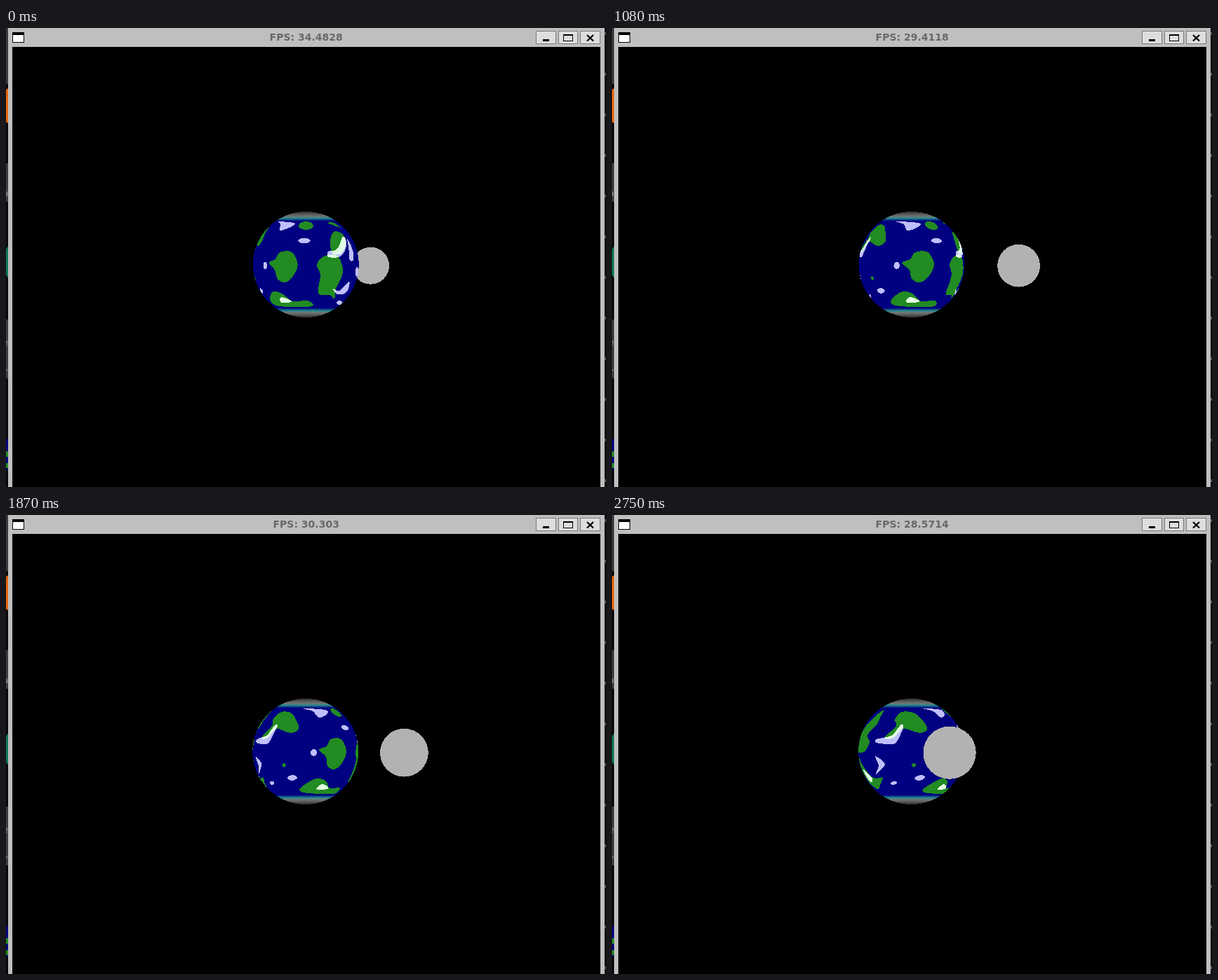
Animation, 855 px wide and 655 px high, one loop 2810 ms. Source, as an HTML page:

```html
<!DOCTYPE html>
<html lang="en">
<head>
<meta charset="utf-8">
<title>Globe and moon</title>
<style>
html, body { margin: 0; width: 100%; height: 100%; overflow: hidden; background: #000; }
svg { display: block; width: 855px; height: 655px; }
#title { font: bold 14px "DejaVu Sans", sans-serif; fill: #686868; text-anchor: middle; }
.side { font: 12px "DejaVu Sans", sans-serif; fill: #999; text-anchor: end; }
.crisp { shape-rendering: crispEdges; }
</style>
</head>
<body>
<svg viewBox="0 0 855 655">
  <defs>
    <linearGradient id="half" gradientUnits="userSpaceOnUse" x1="0" y1="262" x2="0" y2="337.5">
      <stop offset="0" stop-color="#303030"/>
      <stop offset=".07" stop-color="#686868"/>
      <stop offset=".095" stop-color="#6c7878"/>
      <stop offset=".125" stop-color="#258a8e"/>
      <stop offset=".18" stop-color="#000080"/>
    </linearGradient>
    <linearGradient id="sea" href="#half" spreadMethod="reflect"/>
    <clipPath id="onLand"><path id="landClip"/></clipPath>
  </defs>

  <rect width="855" height="655" fill="#080808"/>
  <g id="desk">
    <path fill="#3c3c3c" d="M0 0h3v80h-3zM0 193h3v55h-3zM0 416h3v84h-3z"/>
    <path fill="#e8660c" d="M0 88L3 86V136L0 134z"/>
    <path fill="#0b7a55" d="M0 316L3 311V357L0 352z"/>
    <path fill="#000080" d="M0 588L3 585V630H0z"/>
    <path fill="#228b22" d="M0 604h3v8h-3zM0 621h3v7h-3z"/>
    <text class="side" x="3" y="240">a</text>
    <text class="side" x="3" y="453">e</text>
    <text class="side" x="3" y="489">,</text>
  </g>
  <rect x="3" width="850" height="655" fill="#bfbfbf"/>
  <rect x="9" y="27" width="838" height="628"/>

  <g class="crisp">
    <rect x="9" y="6" width="17" height="15"/>
    <rect x="10" y="10" width="15" height="10" fill="#fff"/>
    <g fill="#dedede" stroke="#787878">
      <rect x="755.5" y="4.5" width="28" height="18"/>
      <rect x="787.5" y="4.5" width="27" height="18"/>
      <rect x="818.5" y="4.5" width="28" height="18"/>
    </g>
    <rect x="765" y="16" width="9" height="3"/>
    <path fill="none" stroke="#000" d="M794.5 9.5h13v9h-13zM795 10.5h13"/>
  </g>
  <path stroke="#000" stroke-width="2.4" d="M828 10l9 8.500M837 10l-9 8.500"/>
  <text id="title" x="427.7" y="18"></text>

  <g id="scene" class="crisp">
    <circle id="moon" cy="339.200" fill="#b2b2b2"/>
    <g id="earth">
      <circle id="ball" cy="337.5" r="75.5" fill="url(#sea)"/>
      <path id="land" fill="#228b22"/>
      <path id="cloud" fill="#bebeff"/>
      <path id="bright" fill="#e2ffe2" clip-path="url(#onLand)"/>
    </g>
  </g>
  <path id="cursor" fill="#a2a2a2" stroke="#555" stroke-width=".6"
        d="M0 0V14.500L3.200 11.600L5.500 17L7.800 16L5.600 10.800H9.200z"/>
</svg>
<script>
const $ = id => document.getElementById(id);
const set = (id, attrs) => Object.entries(attrs).forEach(([k, v]) => $(id).setAttribute(k, v));
const RAD = Math.PI / 180;
const CY = 337.5, R = 75.4;
const LOOP = 2810, FRAME = 67.1, LEAD = 9, LAST = 41;

const turn = ms => 0.0316 * ms;
const centre = ms => 427.3 - 0.0003 * ms;
const ring = y => Math.sqrt(Math.max(1, R * R - (y - CY) ** 2));
const clamp = (v, m) => Math.max(-m, Math.min(m, v));

// Closed Catmull-Rom curve through a few points.
function smooth(pts) {
  const n = pts.length;
  return pts.flatMap((b, i) => {
    const a = pts[(i + n - 1) % n], c = pts[(i + 1) % n], d = pts[(i + 2) % n];
    return [0, 0.2, 0.4, 0.6, 0.8].map(s => [0, 1].map(k =>
      b[k] + 0.5 * s * (c[k] - a[k] +
      s * (2 * a[k] - 5 * b[k] + 4 * c[k] - d[k] +
      s * (3 * (b[k] - c[k]) + d[k] - a[k])))));
  });
}

// Outline as seen at a given time, kept as [longitude at 0, y].
function patch(ms, pts) {
  return smooth(pts.map(([x, y]) =>
    [Math.asin(clamp((x - centre(ms)) / ring(y), 1)) / RAD - turn(ms), y]));
}
const blob = (ms, outline) => patch(ms, outline.split(' ').map(p => p.split(',').map(Number)));
const spot = (ms, x, y, rx, ry) => patch(ms, [0, 1, 2, 3, 4, 5].map(i =>
  [x + rx * Math.cos(i * 60 * RAD), y + ry * Math.sin(i * 60 * RAD)]));

const lands = [
  blob(740, '400,335 411,330 419,320 437,320 446,338 437,356 425,363 414,358 410,345'),
  blob(0, '462,303 467,291 478,293 484,303 478,321 465,321'),
  blob(0, '443,338 453,326 472,325 480,348 470,372 468,386 461,381 445,379 448,352'),
  blob(1350, '405,394 417,379 428,376 439,380 448,390 466,389 464,397 435,398'),
  blob(0, '458,278 467,278 477,285 468,282'),
  blob(2750, '403,292 413,281 433,284 449,303 439,311 415,305 401,318 388,318 405,301'),
  blob(2750, '388,278 369,293 352,318 351,337 359,338 367,324 364,314 378,298'),
  blob(2750, '352,346 371,374 386,375 380,391 366,381'),
  spot(0, 427.5, 282, 10.5, 6),
  spot(1870, 396, 357, 2.7, 2.7)
];
const clouds = [
  blob(0, '479,298 485,304 478,325 460,327 459,319 471,316'),
  blob(0, '486,301 494,317 495,331 489,329'),
  blob(0, '466,372 475,375 489,362 485,377 472,380'),
  blob(1350, '427,391 434,384 446,390 436,392'),
  blob(2750, '412,299 415,303 406,323 397,327 377,325 377,320 398,315 406,306'),
  blob(2750, '358,363 371,376 368,381'),
  blob(1350, '411,276 443,278 445,283 430,289 423,280'),
  blob(2750, '375,344 389,356 376,370 380,358'),
  spot(740, 393, 339, 4, 5),
  spot(1350, 391, 375, 6, 3.8),
  spot(1870, 379, 382.5, 3, 2.5),
  spot(0, 425, 303.5, 9, 3.5),
  spot(0, 475, 392, 4, 3),
  spot(0, 500, 348, 2, 7)
];

// Points past the limb slide along it.
function project(shapes, ms) {
  const spin = turn(ms), cx = centre(ms);
  return shapes
    .filter(s => s.some(([lon]) => Math.abs(lon + spin) < 90))
    .map(s => 'M' + s.map(([lon, y]) => {
      const x = cx + ring(y) * Math.sin(clamp(lon + spin, 90) * RAD);
      return x.toFixed(2) + ' ' + y.toFixed(2);
    }).join('L') + 'z')
    .join('');
}

function drawMoon(ms) {
  const a = (44.2 + 0.0433 * ms) * RAD;
  const r = 1 / (0.033 + 0.0067 * Math.cos(a));
  set('moon', { r, cx: 426.8 + 5.03 * r * Math.sin(a) });
  $('scene').insertBefore($('moon'), Math.cos(a) > 0 ? $('earth') : null);
}

// Frame cost in ms wanders between a few [step, cost] keys.
const costKeys = [[0, 29], [6, 38], [11, 31], [20, 36], [28, 33], [37, 35], [LAST, 35]];
function fps(step) {
  const i = costKeys.findIndex(([s], n) => n && step <= s);
  const [s0, c0] = costKeys[i - 1], [s1, c1] = costKeys[i];
  const cost = Math.round(c0 + (c1 - c0) * (step - s0) / (s1 - s0));
  return Number((1000 / cost).toPrecision(6));
}

function draw(step) {
  const ms = step * FRAME;
  $('title').textContent = 'FPS: ' + fps(step);
  const landPath = project(lands, ms), cloudPath = project(clouds, ms);
  set('ball', { cx: centre(ms) });
  set('land', { d: landPath });
  set('landClip', { d: landPath });
  set('cloud', { d: cloudPath });
  set('bright', { d: cloudPath });
  drawMoon(ms);
  set('cursor', {
    visibility: ms > 200 && ms < 1070 ? 'visible' : 'hidden',
    transform: `translate(729 ${(479.5 - ms / 160).toFixed(1)})`
  });
}

// Marks at the right edge of the desktop.
for (let y = 6; y < 655; y += 58) {
  $('desk').insertAdjacentHTML('beforeend',
    `<rect x="853" y="${y}" width="2" height="4" fill="#555"/>`);
}

let shown = -1;
const begin = performance.now();
function tick() {
  const t = (performance.now() - begin) % LOOP;
  const step = Math.min(LAST, Math.floor((t + LEAD) / FRAME));
  if (step !== shown) draw(shown = step);
  requestAnimationFrame(tick);
}
tick();
</script>
</body>
</html>
```
